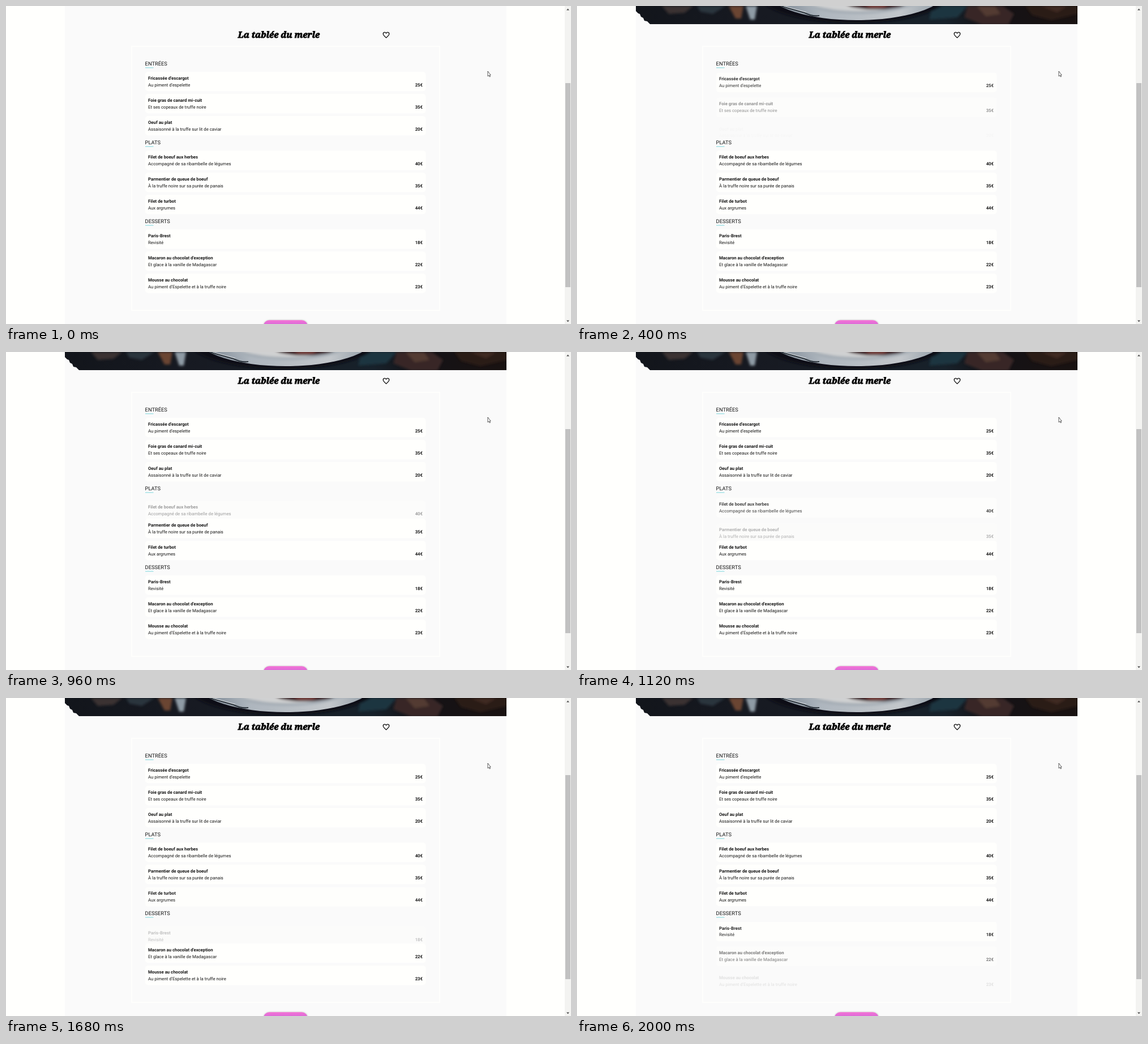
Recreate the animation shown at these times as an HTML page. Size 998 by 561 pixels, loop 2.08 s.

```html
<!DOCTYPE html>
<html lang="fr">
<head>
<meta charset="utf-8">
<title>Menu</title>
<style>
  html, body { margin: 0; width: 100%; height: 100%; overflow: hidden; background: #fffffd; }
  svg { display: block; width: 998px; height: 561px; }
  text { font-family: Roboto, Arial, sans-serif; font-size: 7.78px; fill: #151515; text-rendering: geometricPrecision; }
  .bold { font-weight: 700; }
  .heading { font-size: 9.3px; }
  .title { font: italic 900 15.2px "Noto Serif", serif; fill: #000; stroke: #000; stroke-width: .9px; }
</style>
</head>
<body>
<svg viewBox="0 0 998 561" xmlns="http://www.w3.org/2000/svg">
  <defs>
    <clipPath id="heroClip"><path d="M104 0H884V32H129L124 27 119 26 117 21 113 19 111 14 108 13 104 9Z"/></clipPath>
    <filter id="soft" x="-10%" y="-50%" width="120%" height="200%"><feGaussianBlur stdDeviation="2"/></filter>
    <filter id="shade" x="-20%" y="-60%" width="140%" height="220%"><feGaussianBlur stdDeviation="1.5"/></filter>
    <linearGradient id="pink" x2="0" y2="1">
      <stop stop-color="#f573d6"/><stop offset="1" stop-color="#9b58dc"/>
    </linearGradient>
    <linearGradient id="table">
      <stop stop-color="#12151b"/><stop offset=".3" stop-color="#171a22"/>
      <stop offset=".7" stop-color="#17212a"/><stop offset=".8" stop-color="#141216"/>
      <stop offset="1" stop-color="#191211"/>
    </linearGradient>
    <linearGradient id="plate">
      <stop stop-color="#75818d"/><stop offset=".3" stop-color="#aeb6be"/>
      <stop offset=".75" stop-color="#c3c7cb"/><stop offset="1" stop-color="#8c98a2"/>
    </linearGradient>
  </defs>

  <rect width="998" height="561" fill="#fffffd"/>
  <rect x="104" width="780" height="561" fill="#fafafa"/>

  <g id="hero" clip-path="url(#heroClip)">
    <rect x="104" width="780" height="33" fill="url(#table)"/>
    <g filter="url(#soft)">
      <path d="M150 0H205L190 12 162 14Z" fill="#3a3331"/>
      <path d="M212 0H262L240 14 218 10Z" fill="#29343e"/>
      <path d="M268 0H294L290 22 280 22Z" fill="#6b4433"/>
      <path d="M298 0H318L314 24 306 24Z" fill="#8f9ba5"/>
      <path d="M628 0H690L672 20 622 24Z" fill="#1f3540"/>
      <path d="M690 0H752L772 14 762 33H716L684 20Z" fill="#382826"/>
      <path d="M706 0H738L748 14 722 18Z" fill="#523a33"/>
      <path d="M792 0H884V14L838 25 804 16Z" fill="#2b1c19"/>
      <path d="M820 0H866L848 11Z" fill="#402a23"/>
      <ellipse cx="490" cy="-22" rx="170" ry="52" fill="#0d1016"/>
    </g>
    <ellipse cx="494" cy="-25" rx="156" ry="50" fill="url(#plate)"/>
    <g filter="url(#soft)">
      <ellipse cx="496" cy="-26" rx="124" ry="40" fill="#a5adb5"/>
      <ellipse cx="498" cy="-28" rx="114" ry="37" fill="#d0d1d2"/>
      <ellipse cx="528" cy="-5" rx="53" ry="11" fill="#39191a"/>
      <path d="M508 0H550L540 3 518 3Z" fill="#8e4e46"/>
    </g>
    <path d="M360 0L402 12Q416 19 428 17" fill="none" stroke="#2c343c" stroke-width="2.2"/>
    <path d="M365 0L405 11" stroke="#dce0e3"/>
  </g>

  <text class="title" x="482" y="56.3" text-anchor="middle">La tablée du merle</text>
  <path d="M671.5 56C666.8 52 666.2 50.8 666.2 49.2C666.2 45.8 670.2 45.4 671.5 48.1C672.8 45.4 676.8 45.8 676.8 49.2C676.8 50.8 676.2 52 671.5 56Z"
        fill="none" stroke="#111" stroke-width="1.3" stroke-linejoin="round"/>
  <rect x="222" y="71" width="544" height="466" fill="none" stroke="#fffffd" stroke-width="1.6"/>
  <g id="menu"></g>

  <rect x="455" y="554.5" width="78" height="25" rx="10" fill="#777" opacity=".55" filter="url(#shade)"/>
  <rect x="455" y="554.3" width="77.5" height="25" rx="10" fill="url(#pink)"/>

  <rect x="987" width="11" height="561" fill="#f3f3f1"/>
  <rect x="988" y="136" width="9" height="360" fill="#c1c1c1"/>
  <path d="M990 7.5L992.5 4.5 995 7.5ZM990 554.5L992.5 557.5 995 554.5Z" fill="#505050"/>
  <path d="M851 115V124L853 122.3 854.3 125 855.5 124.4 854.3 121.8H856.2Z"
        fill="#fff" stroke="#333" stroke-width=".8"/>
</svg>
<script>
const LOOP = 2080, STEP = 80, RISE = 650, DROP = 12;

// Each dish: name, description, price, start of its entrance in ms.
const sections = [
  ["ENTRÉES", [
    ["Fricassée d'escargot", "Au piment d'espelette", 25, 30],
    ["Foie gras de canard mi-cuit", "Et ses copeaux de truffe noire", 35, 226],
    ["Oeuf au plat", "Assaisonné à la truffe sur lit de caviar", 20, 386]]],
  ["PLATS", [
    ["Filet de boeuf aux herbes", "Accompagné de sa ribambelle de légumes", 40, 800],
    ["Parmentier de queue de boeuf", "À la truffe noire sur sa purée de panais", 35, 985],
    ["Filet de turbot", "Aux argrumes", 44, 1215]]],
  ["DESSERTS", [
    ["Paris-Brest", "Revisité", 18, 1565],
    ["Macaron au chocolat d'exception", "Et glace à la vanille de Madagascar", 22, 1790],
    ["Mousse au chocolat", "Au piment d'Espelette et à la truffe noire", 23, 1930]]]
];

const menu = document.getElementById("menu");
const hero = document.getElementById("hero");
const dishes = [];

function add(parent, tag, attrs, content = "") {
  const node = document.createElementNS("http://www.w3.org/2000/svg", tag);
  for (const key in attrs) node.setAttribute(key, attrs[key]);
  node.textContent = content;
  return parent.appendChild(node);
}

sections.forEach(([heading, items], s) => {
  const top = 139 * s;
  add(menu, "text", { class: "heading", x: 245.6, y: top + 104.6 }, heading);
  add(menu, "rect", { x: 246, y: top + 108.3, width: 14.5, height: 1.2, fill: "#8fdde3" });
  items.forEach(([name, detail, price, start], i) => {
    const y = top + 116 + 39 * i;
    const group = add(menu, "g", {});
    add(group, "rect", { x: 246, y, width: 495.5, height: 34.3, rx: 5, fill: "#fffffd" });
    add(group, "text", { class: "bold", x: 251, y: y + 13.7 }, name);
    add(group, "text", { x: 251, y: y + 25.6 }, detail);
    add(group, "text", { class: "bold", x: 736, y: y + 25.6, "text-anchor": "end" }, price + "€");
    dishes.push({ group, start });
  });
});

// cubic-bezier(.25, .1, .25, 1), solved by bisection
function ease(x) {
  const bezier = (u, a, b) => 3 * (1 - u) ** 2 * u * a + 3 * (1 - u) * u * u * b + u ** 3;
  let low = 0, high = 1;
  for (let i = 0; i < 20; i++) {
    const u = (low + high) / 2;
    if (bezier(u, .25, .25) < x) low = u;
    else high = u;
  }
  return bezier(low, .1, 1);
}

function render(time) {
  const t = Math.floor((time % LOOP) / STEP) * STEP;
  hero.setAttribute("visibility", t >= STEP ? "visible" : "hidden");
  // A dish stays in place until its entrance starts, then restarts from below.
  for (const { group, start } of dishes) {
    const x = (t - start) / RISE;
    const shown = x >= 0 && x < 1 ? ease(x) : 1;
    group.setAttribute("opacity", shown);
    group.setAttribute("transform", `translate(0 ${DROP * (1 - shown)})`);
  }
}

const origin = performance.now();
function tick() {
  render(performance.now() - origin);
  requestAnimationFrame(tick);
}
tick();
</script>
</body>
</html>
```
